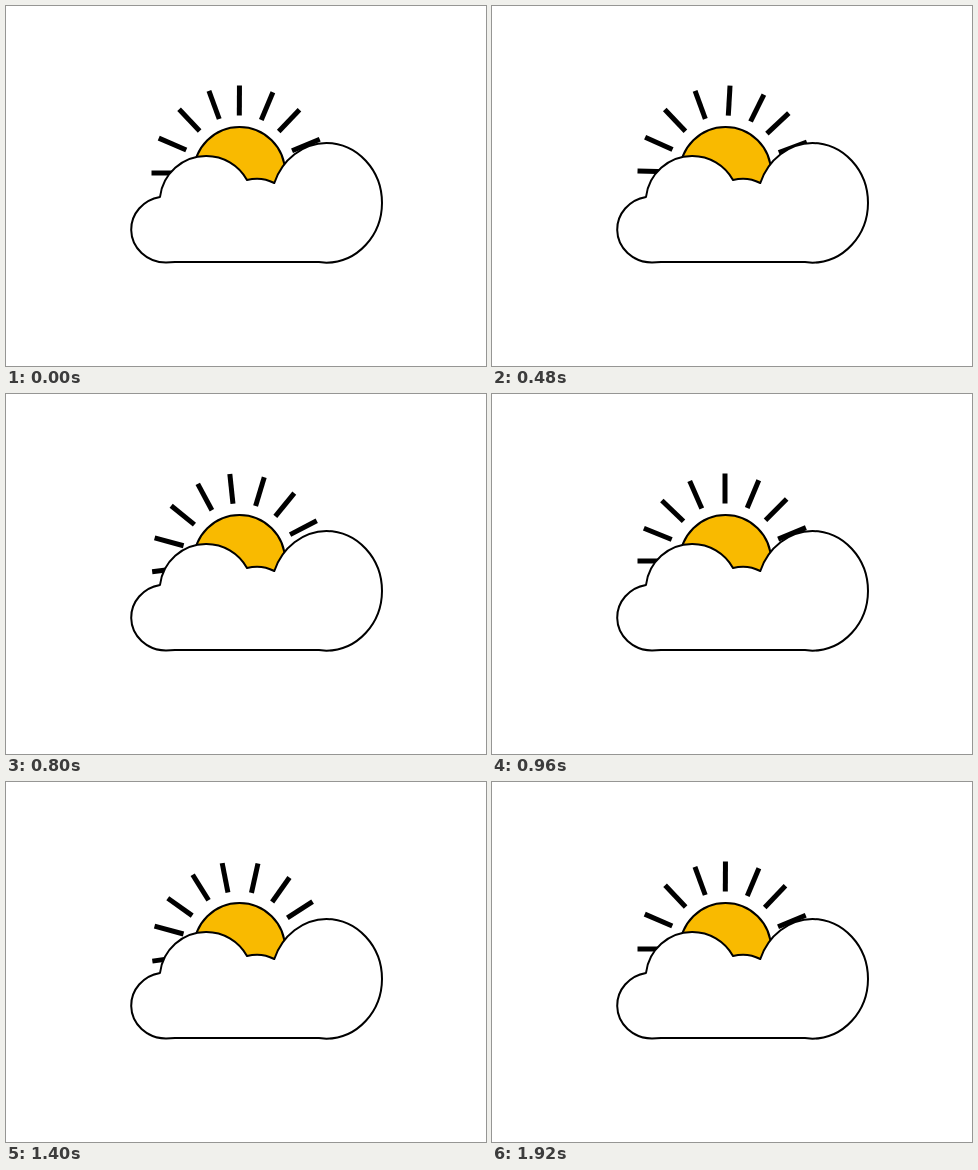
An HTML page for the animation above (2440 ms loop, 480 px wide and 360 px high).

```html
<!DOCTYPE html>
<html lang="en">
<head>
<meta charset="utf-8">
<title>Sun behind a cloud</title>
<style>
  html, body { margin: 0; width: 100%; height: 100%; overflow: hidden; background: #fff; }
  svg { display: block; width: 100%; height: 100%; }
</style>
</head>
<body>
<svg viewBox="0 0 480 360">
  <g id="rays" stroke="#000" stroke-width="5"></g>
  <g stroke="#000" stroke-width="2">
    <circle cx="233.5" cy="166.5" r="45.5" fill="#f9ba00"/>
    <path fill="#fff" stroke-linejoin="round" d="M160 256.5
      A35 33 0 0 1 125.2 224 A35 33 0 0 1 154 191
      A46.4 46.4 0 0 1 200 150 A46.4 46.4 0 0 1 241 174
      A38 38 0 0 1 268.3 177
      A56 60 0 0 1 320.5 137 A56 60 0 0 1 376 197 A56 60 0 0 1 320.5 256.7
      L313 256 H169 Z"/>
  </g>
</svg>
<script>
const LOOP = 2440, SPIN = 1920, STEP = 40;
const CENTER = { x: 233, y: 167 };
const INNER = 57.5, OUTER = 87.5;

// Clockwise from the top, in degrees; the spacing is slightly uneven.
const ANGLES = [0.3, 22.8, 43.7, 67.3, 90, 112, 133.8, 156.2,
                180, 202.7, 224.8, 247.6, 270, 293.5, 316.8, 339.9];

const rays = document.getElementById("rays");
for (const angle of ANGLES) {
  const ray = document.createElementNS("http://www.w3.org/2000/svg", "line");
  ray.setAttribute("y1", -INNER);
  ray.setAttribute("y2", -OUTER);
  ray.setAttribute("transform", `rotate(${angle})`);
  rays.append(ray);
}

// cubic-bezier(.42, 0, .58, 1), solved by bisection
function easeInOut(x) {
  let low = 0, high = 1, s = 0.5;
  for (let i = 0; i < 24; i++) {
    s = (low + high) / 2;
    const r = 1 - s;
    const guess = 1.26 * s * r * r + 1.74 * s * s * r + s ** 3;
    if (guess < x) low = s; else high = s;
  }
  return s * s * (3 - 2 * s);
}

function draw(time) {
  const stepped = Math.floor((time % LOOP) / STEP) * STEP;
  const turn = 360 * easeInOut(Math.min(stepped / SPIN, 1));
  rays.setAttribute("transform", `translate(${CENTER.x} ${CENTER.y}) rotate(${turn})`);
}

const start = performance.now();
function tick() {
  draw(performance.now() - start);
  requestAnimationFrame(tick);
}
tick();
</script>
</body>
</html>
```
